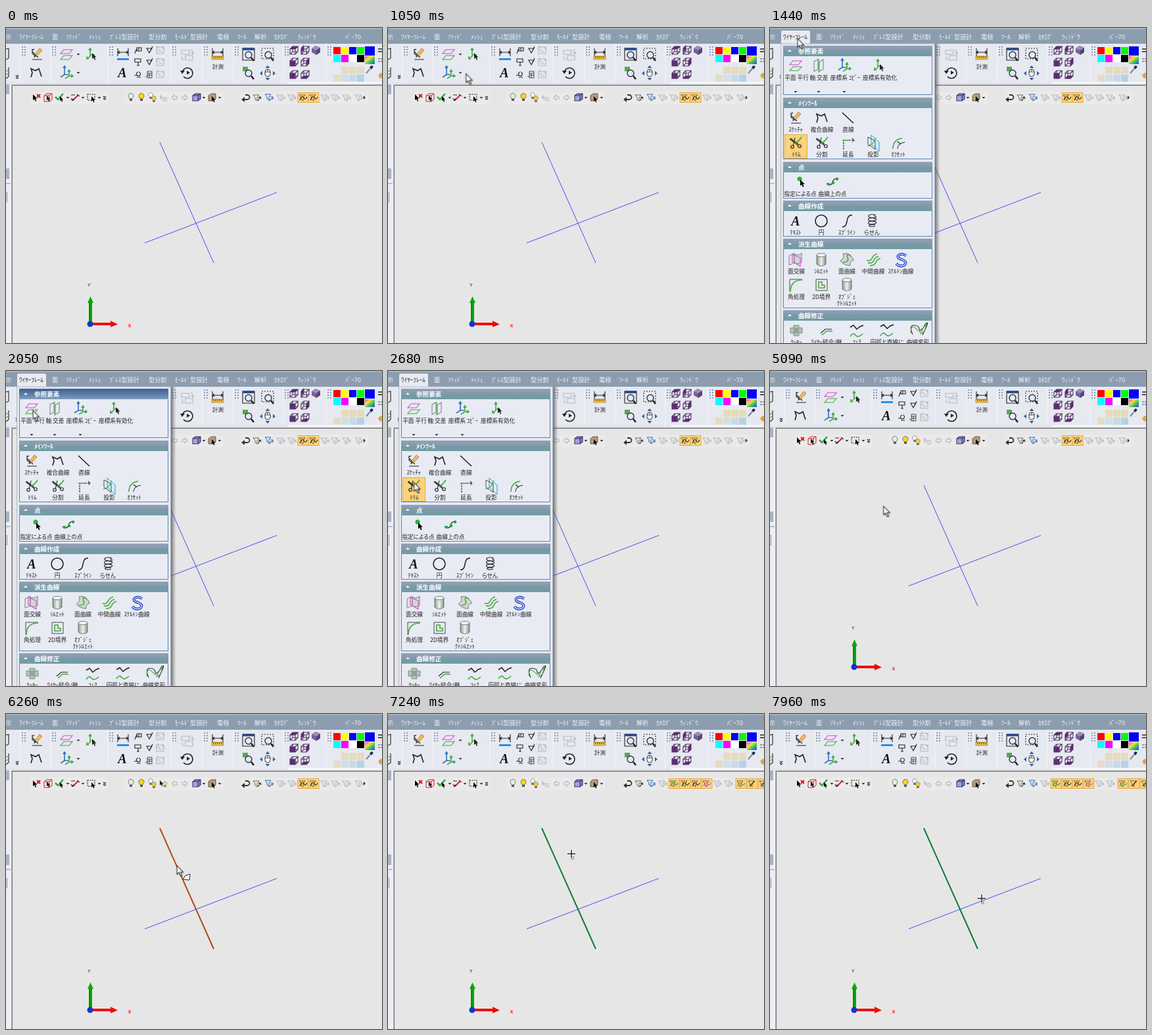
These frames come from a looping animation (572x480 px, 7.99 s). An HTML page:

```html
<!DOCTYPE html>
<html lang="ja">
<head>
<meta charset="utf-8">
<title>CAD</title>
<style>
html,body{margin:0;width:100%;height:100%;overflow:hidden;background:#e6e6e6}
svg{display:block}
text{font:9.2px "Noto Sans CJK JP","Noto Sans CJK",sans-serif;fill:#222}
.bar text{fill:#f3f6f9}
.mid text{text-anchor:middle;font-size:8.7px;font-feature-settings:"palt"}
.mid text.head{fill:#fff;font-weight:700;font-size:9.6px;text-anchor:start}
text.let{font:italic bold 20px "Liberation Serif",serif;fill:#111;text-anchor:middle}
.k,.g,.b,.m,.s,.p,.o{fill:none;stroke-width:1.1}
.k{stroke:#222}.g{stroke:#45a83c}.b{stroke:#2f6fc0}.m{stroke:#e040d8}
.s{stroke:#b4b7bd}.p{stroke:#50305e}.o{stroke:#e09a20}
.h{stroke-width:.8}.w{stroke-width:1.6}.x{stroke-width:2.6}
.on{fill:#fbd27a;stroke:#e2a94a;stroke-width:1}
.t{animation:7990ms step-end infinite}
.off{opacity:0}
#cross-line{stroke:#4a50ee;stroke-width:1}
#pick{stroke:#4a50ee;stroke-width:1;animation-name:pick}
#tab{animation-name:tab}#menu{animation-name:menu}#last{animation-name:last}
#over1{animation-name:over1}#over2{animation-name:over2}
#lit{animation-name:lit}#dim{animation-name:dim}
#setA{animation-name:setA}#setB,#plus{animation-name:setB}
#arrow{animation-name:arrow}#badge{animation-name:badge}
#ptr{animation:move 7990ms linear infinite}
@keyframes pick{
 0%{stroke:#4a50ee;stroke-width:1}
 74.21%{stroke:#ef7a22;stroke-width:2}
 78.34%{stroke:#b04a18;stroke-width:2}
 90.61%,100%{stroke:#0f7a34;stroke-width:2}}
@keyframes tab{0%{opacity:0}16.52%{opacity:1}53.94%,100%{opacity:0}}
@keyframes menu{0%{opacity:0}17.27%{opacity:1}52.31%,100%{opacity:0}}
@keyframes last{0%{opacity:1}19.27%{opacity:0}32.2%,100%{opacity:1}}
@keyframes over1{0%{opacity:0}24.16%{opacity:1}26.4%,100%{opacity:0}}
@keyframes over2{0%{opacity:0}28%{opacity:1}30.3%,100%{opacity:0}}
@keyframes lit{0%{opacity:0}78.34%{opacity:1}90.61%,100%{opacity:0}}
@keyframes dim{0%{opacity:1}78.34%{opacity:0}90.61%,100%{opacity:1}}
@keyframes setA{0%{opacity:1}90.61%,100%{opacity:0}}
@keyframes setB{0%{opacity:0}90.61%,100%{opacity:1}}
@keyframes arrow{0%{opacity:0}8.26%{opacity:1}90.61%,100%{opacity:0}}
@keyframes badge{0%{opacity:0}68.21%{opacity:1}90.61%,100%{opacity:0}}
@keyframes move{
 0%,8.26%{transform:translate(361px,218px)}
 10.64%{transform:translate(232px,140px)}
 13.14%{transform:translate(119px,70px)}
 15.4%{transform:translate(60px,28px)}
 17.5%,23.78%{transform:translate(42px,16px)}
 25.66%{transform:translate(41px,60px)}
 29%{transform:translate(40px,126px)}
 33.54%,57.95%{transform:translate(39.500px,170px);animation-timing-function:ease-in-out}
 67.83%{transform:translate(247px,226px);animation-timing-function:ease-out}
 71.34%,82.1%{transform:translate(260px,231px);animation-timing-function:ease-in-out}
 86.86%,90.61%{transform:translate(279px,213px);animation-timing-function:ease-in-out}
 99.62%,100%{transform:translate(322px,281px)}}
</style>
</head>
<body>
<svg width="572" height="480" viewBox="0 0 572 480">
<defs>
 <linearGradient id="hd" x2="0" y2="1"><stop stop-color="#93a2b6"/><stop offset=".45" stop-color="#8599ac"/><stop offset=".55" stop-color="#769aa6"/><stop offset="1" stop-color="#709ca5"/></linearGradient>
 <linearGradient id="hot" x2="0" y2="1"><stop stop-color="#3f5f92"/><stop offset=".5" stop-color="#5b7ba6"/><stop offset="1" stop-color="#7f9dbd"/></linearGradient>
 <linearGradient id="sh"><stop stop-color="#444" stop-opacity=".75"/><stop offset="1" stop-color="#888" stop-opacity="0"/></linearGradient>
 <linearGradient id="hue" x2="1" y2="1"><stop stop-color="#f4e"/><stop offset=".35" stop-color="#fd3"/><stop offset=".6" stop-color="#4c5"/><stop offset="1" stop-color="#24e"/></linearGradient>
 <linearGradient id="cyl"><stop stop-color="#8b9a94"/><stop offset=".5" stop-color="#eef4ef"/><stop offset="1" stop-color="#83928b"/></linearGradient>
 <path id="tip" d="M0 0V12L2.8 9.6 5 14.4 7 13.5 4.9 8.9H8.6Z"/>
 <g id="grip"><path d="M-5-7V53" stroke="#f5f6fa"/><path d="M-2-3V12M2-3V12" stroke="#8b9cc0" stroke-width="2" stroke-dasharray="2 2"/></g>
 <path id="dd" d="M-2.5-1h5L0 1.7z" fill="#333"/>
 <path id="more" class="k" d="M-2-3L0-1 2-3M-2 0L0 2 2 0"/>
 <g id="sketch"><path class="k" d="M-7-8V-1L-2 3M-7-4L2 5M-7 8H8M-4-8L-7-6"/><path d="M4-9L8-6 0 3-3 0z" fill="#f0b865" stroke="#9a6526" stroke-width=".7"/><path d="M-3 0L0 3-5 5z" fill="#444"/></g>
 <path id="curve" class="k w" d="M-8 7L-6 0-8-6-1-3 4-6 8 6"/>
 <g id="plane"><path class="m" d="M-4-7H9L4-1H-9z"/><path class="g" d="M-4 2H9L4 8H-9z"/></g>
 <g id="meet"><path class="s" style="stroke:#7d8a86" d="M-7-6L-1-9V6L-7 9zM1-5L7-9V6L1 9z"/><path class="g" d="M0-10V11"/></g>
 <g id="axes"><path class="b w" d="M-3-9V3L-9 7M-5-7l2-3 2 3M-3 3H3"/><path class="g w" d="M4-2V5L-2 9M4 5H9M2-1l2-3 2 3M7 3l3 2-3 2"/></g>
 <g id="axis"><path class="g w" d="M-3-8V3L-8 7M-5-6l2-3 2 3M-3 1H4M-8 3V7H-5"/><use href="#tip" transform="translate(0,-2) scale(.75)" fill="#222"/></g>
 <path id="dim1" class="k" d="M-8-8V4M8-8V4M-8-2H8M-5-4L-8-2-5 0M5-4L8-2 5 0"/>
 <path id="leader" class="k" d="M-5 5L-3-1H-1M-2-4H5V1H-2zM1-4V1"/>
 <path id="flag" class="k" d="M-5-4H4V1H-5zM0 1V6M-2 6H2"/>
 <path id="tri" class="k" d="M-4-3H4L0 4zM0 4L5-6"/>
 <path id="tag" class="k" d="M-6 1H-2M1-4A3 3 0 1 1 0-4M-2 4H4"/>
 <path id="grid" class="k h" d="M-3-5H4V5H-3zM-3-2H4M-3 1H4M0-2V5M-6 3H-3"/>
 <path id="pale" class="s" d="M-6-5H5V5H-6zM-6-1H0M-3 2H3M2-5L6-1M-4-7V-3"/>
 <path id="copy" class="s" d="M-9-6H3V0H-9zM-3 2H8V9H-3zM5-7Q9-6 8-1M6-3L8 0 10-3M-8 3V8H-5"/>
 <g id="redo"><path class="k w" d="M-7-3A8 8 0 1 1-6 6"/><path d="M-11-3H-4L-8 2zM-1-3L4 0-1 3z" fill="#222"/></g>
 <g id="lens"><path class="k x" d="M5 5L9 10"/><circle cx="1" cy="1" r="5" fill="#dcecf5" stroke="#333" stroke-width="1.4"/></g>
 <g id="mouse"><rect x="-4" y="-5" width="8" height="11" rx="4" fill="#fff" stroke="#333"/><path d="M-4-1H4M0-5V-1" class="k h"/><path d="M0-11l3.500 4h-7zM0 12l3.500-4h-7zM-12 1l4-3.500v7zM12 1l-4-3.500v7z" fill="#2d63a8"/></g>
 <path id="cube" class="p" d="M-6-2H2V6H-6zM-6-2L-2-6H6L2-2M6-6V2L2 6M-2-6V2L-6 6M-2 2H6"/>
 <g id="box"><path d="M-6-3L-2-6H6V2L2 5H-6z" fill="#7480cc"/><path d="M-6-3H2V5H-6z" fill="#9aa6e6"/><path class="p" d="M-6-3H2V5H-6zM-6-3L-2-6H6V2L2 5M2-3L6-6"/></g>
 <g id="bulb"><path d="M-2 2A4 4 0 1 1 2 2V3H-2z" stroke="#556" stroke-width=".8"/><path d="M-2 3H2V6H-2z" fill="#555"/></g>
 <path id="funnel" d="M-6-4H3L0 0V5L-3 3V0z" stroke-width=".9"/>
 <path id="fg" class="s" d="M-6-4H3L0 0V5L-3 3V0zM1 4L6-1M2-1H6V3"/>
 <g id="fk"><use href="#funnel" fill="#f6ecd2" stroke="#555"/><path class="k" d="M1 5L5-1M2 0L5-1 6 2"/></g>
 <g id="sel"><rect class="on" x="-8" y="-7.500" width="16" height="15"/><use href="#funnel" fill="#f6dc9c" stroke="#6b4a12"/></g>
 <path id="back" class="s" d="M-4 0L0-4V-2H4V2H0V4z"/>
 <g id="cut"><path class="k" d="M-9-6L4 4M-8-7L4 2M-1-8L-4 5"/><circle cx="-5" cy="6" r="2.3" class="k"/><circle cx="6" cy="5" r="2.3" class="k"/><path class="g w" d="M-2 1Q5-2 9-9"/></g>
 <path id="screw" class="k" d="M6-9C-5-12-9-6-1-5S9-6 3-8M6-4C-9-6-8 1 1 0S7-4 2-4M6 1C-9-1-8 6 1 5S7 1 2 1M5 6C-9 4-6 11 5 8"/>
 <g id="sheet"><path d="M-10-6L-2-10V5L-10 8z" fill="#dfe5e1" stroke="#667" stroke-width=".8"/><path d="M-2-8Q5-6 9-10V4Q4 8-2 5z" fill="#cfd9d4" stroke="#667" stroke-width=".8"/><path class="m" d="M-5-8L7-3V10L-5 3z"/></g>
 <g id="tube"><path d="M-7-7V7Q0 12 7 7V-7z" fill="url(#cyl)" stroke="#58675f" stroke-width=".8"/><ellipse cy="-7" rx="7" ry="2.7" fill="#f0f4f0" stroke="#58675f" stroke-width=".8"/></g>
 <g id="surf"><path d="M-10 2Q-3-2-6-9Q4-11 5-5Q9-5 10 1Q4 2 5 9Q-4 9-10 2z" fill="#cdd8d2" stroke="#52635b" stroke-width=".8"/><path class="g w" d="M-6 4Q4 4 1-3T6-6"/></g>
 <path id="waves" class="g w" d="M-10 1Q-4 3-2-2T6-9M-8 5Q-1 6 1 1T8-5M-5 9Q2 9 4 4T11-2"/>
 <path id="bone" d="M7-6Q0-11-5-6Q-7-2 1 0Q9 3 5 8Q-2 12-8 6" fill="none"/>
 <path id="zig" class="k w" d="M-10-4L-5-7 0-1 5-5 10-7"/>
 <path id="wave" class="g w" d="M-10 6Q-6-1-2 4T9 2"/>
</defs>

<!-- window frame -->
<rect width="572" height="480" fill="#e6e6e6"/>
<rect width="572" height="3" fill="#a5b1be"/>
<rect y="2" width="572" height="22" fill="#8b9dae"/>
<rect y="24" width="572" height="60" fill="#e7e9f1"/>
<rect y="83" width="572" height="4" fill="#e3e4e9"/>
<rect x="430" y="82" width="142" height="3" fill="#f5f6f8"/>
<rect y="86" width="8" height="394" fill="#eceef3"/>
<path d="M0 86H5V101H0zM0 214H5V230H0z" fill="#a9b2c8"/>
<path d="M0 250.500H1.500V265H0M0 237H7" fill="none" stroke="#8b8f99"/>
<path d="M9.250 480V87.250H572" fill="none" stroke="#77797c" stroke-width="1.500"/>
<g class="bar" id="bar"></g>

<!-- ribbon -->
<g id="ribbon"></g>
<path class="k" d="M0 32L4 31V46L0 48M4 60V74L0 77"/><path class="g" d="M0 66L4 64M0 71L4 69"/>
<path d="M169 46H187V49H169z" fill="#2f8de4"/>
<path d="M313 43H331V48H313z" fill="#f2c53c" stroke="#98772a" stroke-width=".7"/><path class="k h" d="M316 43v3m3-3v3m3-3v3m3-3v3m3-3v3"/>
<text class="let" x="177" y="75">A</text>
<text x="314" y="61.500" style="font-size:8.500px">計測</text>
<path class="k" d="M360 31H378V49H360z"/><path d="M360 30H378V34H360z" fill="#2e4f8c"/><path class="k" stroke-dasharray="2 2" d="M389 31H407V47H389z"/>
<use href="#lens" x="368" y="40"/><use href="#lens" x="398" y="40"/><path d="M360 59h8v7h-8z" fill="#59a84c"/><use href="#lens" x="368" y="68"/>
<g fill="#5b2e72"><path d="M432 32L436 28H444L440 32zM449 38L453 34V26L449 30zM432 50H440V58H432zM457 50L461 46V54L457 58zM432 69H440V77H432zM449 77L453 73H461L457 77z"/></g>
<path d="M465 31L471 27 478 30V37L472 41 465 37z" fill="#756299"/><path d="M465 31L471 27 478 30 472 34z" fill="#9e8cbc"/><path d="M472 34L478 30V37L472 41z" fill="#584477"/>
<g id="swatch"></g>
<rect x="546" y="28" width="15" height="14" fill="#0000f4"/><rect x="546" y="43" width="15" height="12" fill="url(#hue)"/>
<path d="M548 69L554 62" stroke="#78a" stroke-width="2"/><path d="M553 60L556 63 559 59 556 57z" fill="#224"/>
<path d="M566 32H572M566 36H572" stroke="#222" stroke-width="1.500"/><path d="M566 47H572M566 51H572" stroke="#444" stroke-dasharray="3 1"/><path d="M566 72L570 68 572 69V76L569 77z" fill="#e9a33a"/>

<!-- view toolbar -->
<g fill="#eaeaeb"><rect x="38" y="97" width="118" height="19" rx="3"/><rect x="180" y="97" width="151" height="19" rx="3"/><rect x="357" y="97" width="194" height="19" rx="3"/></g>
<g id="view"></g>
<use href="#tip" transform="translate(41,101) scale(.75)"/><path d="M47 101L52 106M52 101L47 106" stroke="#e01010" stroke-width="2"/>
<path d="M58 103L62 100H70V109L66 112H58zM58 103H66V112M66 103L70 100" fill="none" stroke="#c22"/><use href="#tip" transform="translate(62,103) scale(.6)"/>
<path d="M75 105L79 109 87 100" fill="none" stroke="#2fae3a" stroke-width="2.500"/><use href="#tip" transform="translate(82,104) scale(.6)"/>
<path d="M99 102H105M108 101L112 104M101 111L99 107" class="k"/><path d="M103 109L110 102" stroke="#d02020" stroke-width="2"/><path d="M102 107L104 110 100 111z" fill="#222"/>
<path d="M124 101H135V110H124z" class="k" stroke-dasharray="2 1.500"/><use href="#tip" transform="translate(130,104) scale(.65)"/>
<use href="#bulb" x="190" y="105" fill="#e3f1dc"/><use href="#bulb" x="206" y="105" fill="#ffd51c"/><use href="#bulb" transform="translate(220,103) scale(.8)" fill="#fff"/><use href="#bulb" transform="translate(225,108) scale(.8)" fill="#ffd51c"/>
<g id="dim" class="t"><use href="#tip" transform="translate(234,101) scale(.65)" fill="#c4c5c8"/><path class="s" d="M240 106h4v5h-4z"/></g>
<g id="lit" class="t off"><use href="#tip" transform="translate(234,101) scale(.65)" fill="#222"/><use href="#bulb" transform="translate(242,107) scale(.7)" fill="#ffe36a"/></g>
<path d="M308 103L312 100H319V108L315 111H308z" fill="#b59a7c" stroke="#543" stroke-width=".8"/><use href="#tip" transform="translate(313,104) scale(.65)"/>
<path d="M361 109H367A3.300 3.300 0 0 0 367 102H364" fill="none" stroke="#333" stroke-width="1.800"/><path d="M358 109L363 105V113z" fill="#333"/>
<use href="#fk" x="382" y="106"/><use href="#funnel" x="400" y="105" fill="#dbe8f6" stroke="#26588f"/><path class="b" d="M400 111L406 106M402 105h4v4"/>
<g id="setA" class="t"></g>
<g id="setB" class="t off"></g>

<!-- model -->
<path id="cross-line" d="M211 327.500L412 250.500"/>
<path id="pick" class="t" d="M234 174L316 358"/>
<path d="M126 448V419H124L128.500 409 133 419H131V448z" fill="#0aa80a"/><path d="M127.500 447V418" stroke="#067406"/>
<path d="M132 449H159V446L170 451.500 159 456V453H132z" fill="#f00808"/>
<circle cx="128" cy="451" r="4.500" fill="#1532cf"/>
<text x="124" y="394" style="font:bold 6.500px 'DejaVu Sans',sans-serif;fill:#27a52b">Y</text>
<text x="185.500" y="455.500" style="font:bold 6.500px 'DejaVu Sans',sans-serif;fill:#e33">X</text>

<!-- drop-down menu -->
<g id="tab" class="t off"><path d="M17 24V6Q17 4 19 4H59Q61 4 61 6V24z" fill="#e9ebf3"/><text x="20" y="16.500">ﾜｲﾔｰﾌﾚｰﾑ</text></g>
<g id="menu" class="t off">
 <rect x="251" y="24" width="8" height="456" fill="url(#sh)"/>
 <path d="M16.500 480V24H250.500V480" fill="#e5e8f0" stroke="#b3bac8"/>
 <g id="panels" class="mid"></g>
 <rect id="last" class="t on" x="22.500" y="162.500" width="34" height="36"/>
 <g id="tools" class="mid"></g>
 <text class="let" x="39" y="301">A</text>
 <circle cx="78" cy="294" r="9" class="k w"/>
 <path class="k w" d="M110 303C121 303 113 285 125 285M110 129L127 145"/>
 <path class="g w" d="M110 171H120"/><path class="k" d="M112 185V172M120 171H128M125 168l3 3-3 3" stroke-dasharray="3 1"/>
 <path d="M154 163L166 174V188L154 177z" fill="#d5eef8" stroke="#389bc8"/><path class="g" d="M148 180Q157 179 161 167"/><path class="k h" d="M149 177L160 185V172L149 166z"/>
 <path class="g w" d="M187 184Q187 170 201 168"/><path class="k" d="M194 184Q194 176 205 174M194 173l5 4"/>
 <circle cx="45" cy="230" r="3.500" fill="#27b13b"/><use href="#tip" transform="translate(46,231) scale(.8)"/>
 <path class="k" d="M86 237Q93 242 95 235T104 230"/><g fill="#27a83a"><circle cx="89" cy="238" r="2.300"/><circle cx="96" cy="236" r="2.300"/><circle cx="102" cy="230" r="2.300"/></g>
 <path class="k h" d="M30 402V383H49"/><path class="g w" d="M31 402Q31 384 49 384"/>
 <path class="k h" d="M70 383H87V400H70z"/><path class="g w" d="M74 387H79V392H83V396H74z"/>
 <path d="M36 453H44V457H49V465H44V469H36V465H31V457H36z" fill="#b3c3b9" stroke="#7c9084"/><path d="M36 457H44V465H36z" fill="#8fa398"/>
 <path class="k" d="M77 465L84 459H94"/><path class="g w" d="M79 468L86 462H95"/>
 <path class="k" d="M217 467Q211 453 219 453T227 459 236 453 232 468"/><path class="g" d="M214 465Q214 449 224 460T237 455 229 467"/>
</g>

<!-- pointer -->
<g id="ptr">
 <g id="arrow" class="t off"><g transform="scale(1.1)"><use href="#tip" x="1.500" y="1.500" fill="#777" opacity=".45"/><use href="#tip" fill="#fff" stroke="#333"/></g>
  <path id="badge" class="t off" d="M9 21L13 15 20 13 19 22z" fill="#f4f4f0" stroke="#222"/></g>
 <g id="plus" class="t off"><path d="M-1 3H4V9H-1z" fill="#999" opacity=".6"/><path d="M-6 0H6M0-6V6" stroke="#fff" stroke-width="3"/><path d="M-6 0H6M0-6V6" stroke="#222" stroke-width="1.400"/></g>
</g>
</svg>
<script>
const $ = id => document.getElementById(id);
const add = (id, html) => $(id).insertAdjacentHTML('beforeend', html);
const text = (s, x, y, c = '') => `<text class="${c}" x="${x}" y="${y}">${s}</text>`;
const use = (name, y, ...xs) => xs.map(x => `<use href="#${name}" x="${x}" y="${y}"/>`).join('');
// "label@x" entries sharing one baseline
const row = (s, y) => s.split('|').map(p => text(...p.split('@'), y)).join('');

add('bar', row('示@-1|ﾜｲﾔｰﾌﾚｰﾑ@20|面@70|ｿﾘｯﾄﾞ@91|ﾒｯｼｭ@126|ﾌﾟﾚｽ型設計@157|型分割@217|ﾓｰﾙﾄﾞ型設計@257|電極@321|ﾂｰﾙ@352|解析@378|ｶﾀﾛｸﾞ@408|ｳｨﾝﾄﾞｳ@444|ﾊﾞｰ70@516', 16.5));

add('ribbon', use('grip', 31, 27, 73, 160, 256, 304, 351, 427, 492) +
  use('more', 75, 17) + use('sketch', 40, 47) + use('curve', 68, 46) +
  use('plane', 40, 92) + use('axes', 68, 92) + use('axis', 40, 131) +
  use('dd', 40, 110) + use('dd', 68, 110) + use('dim1', 39, 178, 322) +
  use('leader', 34, 201) + use('flag', 51, 201) + use('tag', 71, 201) +
  use('tri', 34, 218) + use('tri', 52, 218) + use('grid', 71, 218) +
  use('pale', 34, 235) + use('pale', 52, 235) + use('pale', 71, 235) +
  use('copy', 40, 276) + use('redo', 68, 276) + use('mouse', 68, 398) +
  use('cube', 34, 438, 455) + use('cube', 52, 438, 455) + use('cube', 71, 438, 455));

['#f00 #ff0 #00f #0f0', '#0ff #f0f #fff #000', '- #e6dcb8 #e6dcb8 #e6dcb8', '#e6dcc4 #cfe0e9 #c7dbe6 #b5d3e4']
  .forEach((r, j) => r.split(' ').forEach((c, i) => c !== '-' && add('swatch',
    `<rect x="${498 + 12 * i}" y="${[29, 41, 59, 71][j]}" width="11" height="11" fill="${c}"/>`)));

add('view', use('dd', 106, 94, 117, 142, 301, 325) + use('more', 107, 150) + use('back', 106, 256) +
  `<use href="#back" transform="translate(272,106) scale(-1,1)"/>` + use('box', 106, 290));

const hook = (x, c) => `<path class="${c}" d="M${x - 5} 110Q${x - 1} 101 ${x + 1} 106T${x + 6} 105"/>`;
add('setA', use('fg', 106, 418, 435, 485, 501, 518, 537) + use('sel', 106, 452, 468) +
  hook(452, 'k') + hook(468, 'k') + '<path d="M544 103V109L547 106z" fill="#333"/>');
add('setB', use('fg', 106, 418, 501, 518) + use('sel', 106, 435, 452, 468, 485, 537, 554, 571) +
  hook(435, 'g w') + hook(452, 'k') + hook(468, 'k') + hook(485, 'm') + hook(537, 'g') +
  '<path class="k" d="M550 110L558 102M567 110L572 104"/>');

const header = (y, fill, extra = '') => `<rect x="20" y="${y}" width="227" height="16" fill="url(#${fill})" ${extra}/>`;
[['参照要素', 27, 102], ['ﾒｲﾝﾂｰﾙ', 106, 200], ['点', 204, 260], ['曲線作成', 263, 318], ['派生曲線', 321, 427], ['曲線修正', 430, 490]]
  .forEach(([name, y, end], i) => add('panels',
    `<rect x="20.5" y="${y + .5}" width="226" height="${end - y - 1}" fill="#e8ebf3" stroke="#6284b4"/>` +
    header(y, 'hd') + (i < 2 ? header(y, 'hot', `id="over${i + 1}" class="t off"`) : '') +
    `<path d="M27 ${y + 9}h6l-3-3z" fill="#fff"/>` + text(name, 43, y + 11.5, 'head')));

add('tools', use('plane', 57, 39) + use('axes', 57, 113) + use('meet', 57, 74) + use('axis', 57, 167) + use('dd', 97, 39, 74, 113) +
  use('sketch', 137, 39) + use('curve', 137, 79) + use('cut', 175, 39, 79) + use('screw', 294, 155) +
  use('sheet', 353, 39) + use('tube', 353, 78) + use('surf', 353, 117) + use('waves', 353, 157) +
  `<g stroke="#2540c8" stroke-width="4">${use('bone', 353, 200)}</g><g stroke="#b9d2f4" stroke-width="1.6">${use('bone', 353, 200)}</g>` +
  use('tube', 391, 117) + use('zig', 460, 132) + use('wave', 464, 132) + use('zig', 459, 178) + use('wave', 463, 178) +
  row('平面 平行@40.5|軸 交差@74.5|座標系 ｺﾋﾟｰ@114.5|座標系有効化@167', 79) +
  row('ｽｹｯﾁｬ@39|複合曲線@79|直線@119', 158) +
  row('ﾄﾘﾑ@40|分割@79|延長@119|投影@157|ｵﾌｾｯﾄ@195', 196) +
  row('指定による点@46|曲線上の点@95', 255.5) +
  row('ﾃｷｽﾄ@39|円@78|ｽﾌﾟﾗｲﾝ@117|らせん@155', 315) +
  row('面交線@40|ｼﾙｴｯﾄ@78|面曲線@117|中間曲線@157|ｽｹﾙﾄﾝ曲線@199', 374) +
  row('角処理@40|2D境界@78|ｵﾌﾞｼﾞｪ@117', 412.5) + row('ｸﾄｼﾙｴｯﾄ@117', 422.5) +
  row('ｸｯｷｰ@40|ﾜｲﾔｰ結合/継@86|ﾌｪｱ@132|円弧と直線に@178|曲線変形@225', 482));
</script>
</body>
</html>
```
